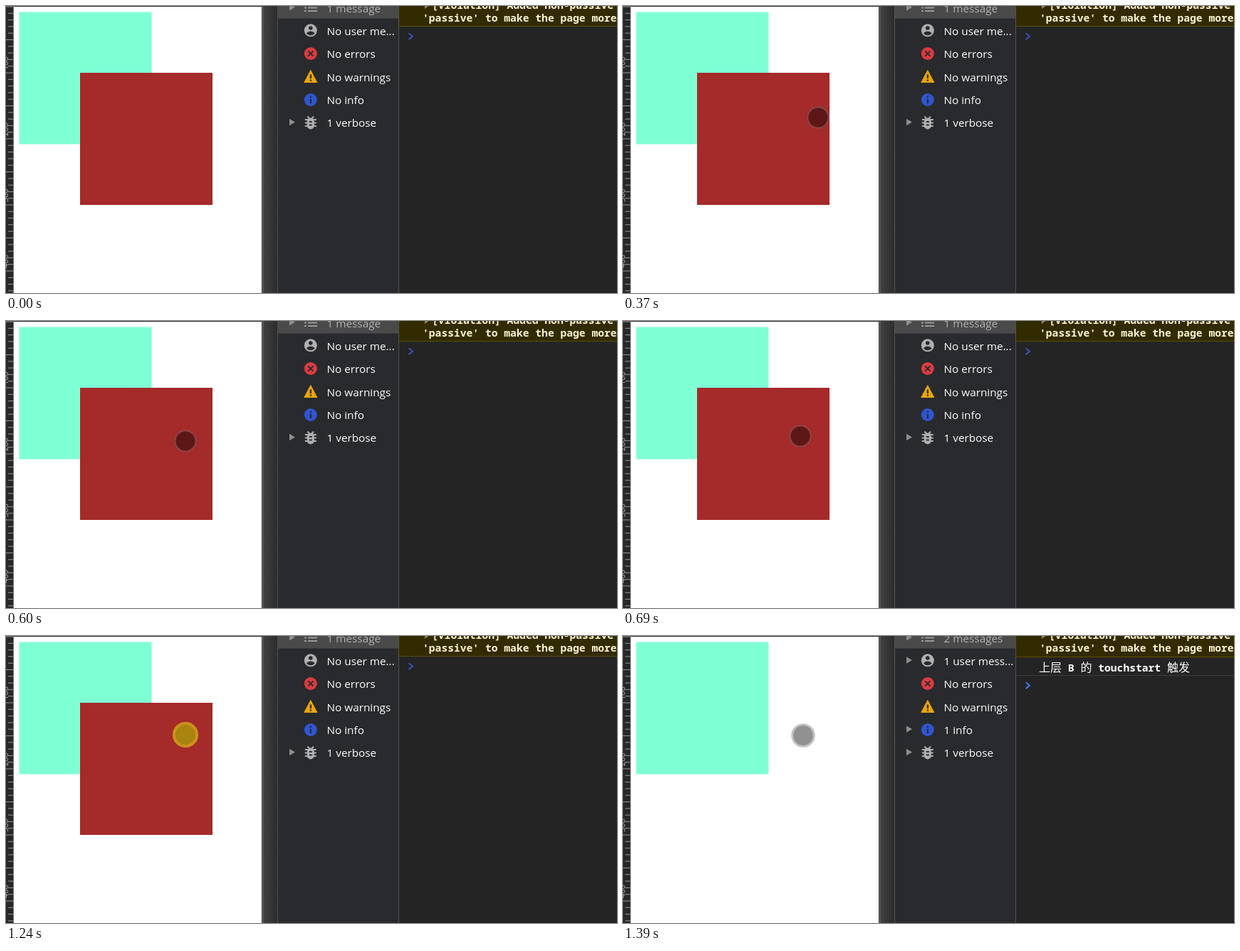
Recreate the animation shown at these times as an HTML page. Size 858 px wide and 404 px high, loop 1780 ms.

```html
<!DOCTYPE html>
<html lang="en">
<head>
<meta charset="utf-8">
<title>Touch test with console</title>
<style>
  html, body { margin: 0; width: 100%; height: 100%; overflow: hidden; background: #242424; }
  svg { display: block; }
  text { white-space: pre; }
  .label { font: 15.3px "Open Sans", sans-serif; fill: #fff; }
  .label.selected { fill: #b4b4b4; }
  .mono { font: 600 14.67px "Noto Sans Mono", monospace; }
  .cjk { font: 400 16px "Noto Sans CJK SC", "Noto Sans CJK", sans-serif; }
  .tick { font: 11px "Open Sans", sans-serif; fill: #b4b4b4; }
</style>
</head>
<body>
<svg width="858" height="404" viewBox="0 0 858 404">
  <defs>
    <linearGradient id="gutter">
      <stop offset="0" stop-color="#424242"/>
      <stop offset=".5" stop-color="#373737"/>
      <stop offset="1" stop-color="#2c2c2c"/>
    </linearGradient>
  </defs>

  <!-- Device view -->
  <rect width="361" height="404" fill="#282828"/>
  <g id="ruler" stroke="#999"></g>
  <rect x="11" y="1" width="348" height="403" fill="#fff"/>
  <path d="M10.5 0V404" stroke="#777"/>
  <rect x="18.5" y="8.5" width="186" height="186" fill="#7fffd4"/>
  <rect id="topBox" x="104" y="94" width="186" height="186" fill="#a52a2a"/>
  <g id="pointer">
    <circle id="ring" fill="none"/>
    <circle id="core" r="13.7"/>
  </g>
  <rect x="360" width="21" height="404" fill="url(#gutter)"/>
  <path d="M360.5 0V404" stroke="#777"/>

  <!-- Sidebar -->
  <rect x="381" width="171" height="404" fill="#292a2d"/>
  <rect x="382" width="169" height="17.5" fill="#4a4a4a"/>
  <path d="M381.5 0V404M551.5 0V404" stroke="#525355"/>
  <g id="rows"></g>
  <path d="M419 2.5h3M424 2.5h13M419 7h3M424 7h13" stroke="#9a9a9a" stroke-width="2"/>
  <g fill="#292a2d">
    <circle cx="427.8" cy="34.3" r="9" fill="#b0b0b0"/>
    <circle cx="427.8" cy="31" r="2.8"/>
    <path d="M422 38.2q2-2.8 5.8-2.8t5.8 2.8q-2 3-5.8 3t-5.8-3z"/>
    <circle cx="427.8" cy="67" r="9" fill="#db3b40"/>
    <path d="M424.2 63.4l7.2 7.2m0-7.2l-7.2 7.2" stroke="#292a2d" stroke-width="2"/>
    <path d="M427.8 90.5L436.8 107.5H418.8Z" fill="#e8a50d" stroke="#e8a50d" stroke-linejoin="round"/>
    <path d="M426.8 96.5h2.2v5.5h-2.2zM426.8 103.5h2.2v2.2h-2.2z"/>
    <circle cx="427.8" cy="132" r="9" fill="#2f55cf"/>
    <path d="M426.8 127h2.2v2.2h-2.2zM426.8 131h2.2v6h-2.2z"/>
  </g>
  <g stroke="#b0b0b0" stroke-width="2" fill="none">
    <path d="M419.8 160h16M419.8 164.5h16M419.8 169h16M423.5 155.5l2.5 3M432 155.5l-2.5 3"/>
    <rect x="422.8" y="157.5" width="10" height="16" rx="5" fill="#b0b0b0" stroke="none"/>
    <path d="M425.8 163h4M425.8 167.5h4" stroke="#292a2d"/>
  </g>

  <!-- Console -->
  <rect x="552" width="306" height="28" fill="#332b00"/>
  <path d="M552 28.5H858" stroke="#5c4d08"/>
  <path d="M588-4L593.5 0L588 4Z" fill="#8b866f"/>
  <g class="mono" fill="#fbf4d4">
    <text x="598" y="4">[Violation] Added non-passive</text>
    <text x="585" y="22">'passive' to make the page more</text>
  </g>
  <g id="message">
    <path d="M552 28.5H858" stroke="#332b00"/>
    <path d="M552 29.5H858" stroke="#5c4d08"/>
    <path d="M552 55.5H858" stroke="#3c3c3c"/>
    <text x="584" y="49.5" class="mono" fill="#fff"><tspan class="cjk">上层</tspan> B <tspan class="cjk">的</tspan> touchstart <tspan class="cjk">触发</tspan></text>
  </g>
  <path id="prompt" d="M565.5 38.3l5.5 4.4l-5.5 4.4" fill="none" stroke-width="2"/>
</svg>
<script>
  const LOOP = 1780, TAP = 1240, REMOVED = 1340, LOGGED = 1390;
  const $ = id => document.getElementById(id);
  const set = (id, attrs) => {
    for (const name in attrs) $(id).setAttribute(name, attrs[name]);
  };
  const show = (id, visible) => set(id, { visibility: visible ? "visible" : "hidden" });

  // Pointer samples: start time, x, y
  const path = [
    [130, 318, 46], [210, 312, 80], [290, 297, 121], [370, 274, 157],
    [450, 261, 171], [520, 255, 172], [600, 252, 169],
    [690, 249, 162], [770, 251, 148], [840, 253, 140],
    [TAP, 252, 139], [REMOVED, 253, 140]
  ];

  // Sidebar labels before and after the box is removed
  const rows = [
    ["1 message", "2 messages"], ["No user me...", "1 user mess..."],
    ["No errors"], ["No warnings"], ["No info", "1 info"], ["1 verbose"]
  ];
  const alwaysOpenable = [0, 5];

  $("rows").innerHTML = rows.map(([label], i) => {
    const y = 2 + i * 32.35;
    return `<path id="arrow${i}" d="M398 ${y - 5}L406 ${y - 0.3}L398 ${y + 4.4}Z" fill="#8e8e8e"/>
      <text id="label${i}" class="label${i ? "" : " selected"}" x="450.5" y="${Math.round(y + 6.5)}">${label}</text>`;
  }).join("");

  let ticks = "";
  for (let i = 0; i < 44; i++) {
    const y = 1 + i * 9.3;
    ticks += `<path d="M${i % 5 ? 3 : 0} ${y}H10"/>`;
    if (i && i % 10 === 0)
      ticks += `<text class="tick" stroke="none" transform="translate(2.5 ${y - 4}) rotate(-90)">${i * 10}</text>`;
  }
  $("ruler").innerHTML = ticks;

  function draw(now) {
    const t = now % LOOP;
    const removed = t >= REMOVED, logged = t >= LOGGED, tapped = t >= TAP && !removed;

    const sample = path.filter(([start]) => start <= t).pop();
    show("pointer", sample);
    if (sample) set("pointer", { transform: `translate(${sample[1]} ${sample[2]})` });
    const width = tapped ? 4.6 : removed ? 3.3 : 2.2;
    set("ring", {
      r: 13.5 + width / 2,
      "stroke-width": width,
      stroke: tapped ? "#c9921b" : "rgba(110,110,110,.42)"
    });
    set("core", { fill: tapped ? "#a8850f" : "rgba(0,0,0,.43)" });

    show("topBox", !removed);
    rows.forEach(([before, after], i) => {
      $("label" + i).textContent = removed && after || before;
      show("arrow" + i, alwaysOpenable.includes(i) || removed && after);
    });

    show("message", logged);
    set("prompt", {
      transform: `translate(0 ${logged ? 27 : 0})`,
      stroke: logged ? "#3b7de8" : "#3553b5"
    });
  }

  const begin = performance.now();
  function loop() {
    draw(performance.now() - begin);
    requestAnimationFrame(loop);
  }
  loop();
</script>
</body>
</html>
```
